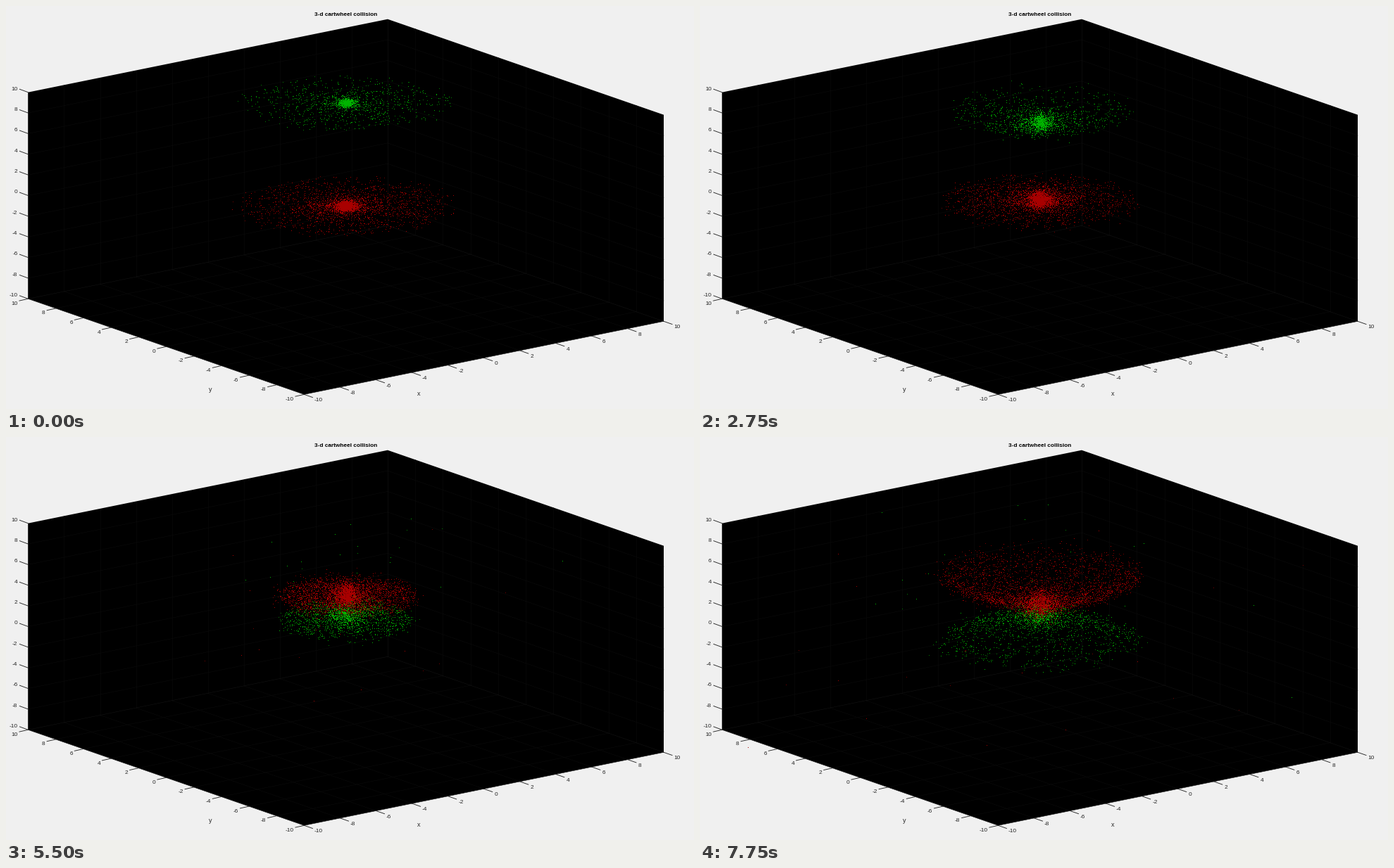
Write a matplotlib script that moves like this. It is 977x573 px and loops after 8000 ms.

```python
import numpy as np
import matplotlib.pyplot as plt
from matplotlib.animation import FuncAnimation

W, H, DPI = 977, 573, 64
FRAMES, INTERVAL = 32, 250
PX = 72 / DPI  # points per pixel
INK = "#262626"

plt.rcParams["font.family"] = "Liberation Sans"

# Orthographic view: screen shift per data unit
CENTER = np.array([482.7, 285.5])
EX = np.array([25.53, -5.2])
EY = np.array([-19.6, -6.8])
EZ = np.array([0.0, -14.68])
TILT = 0.266  # height to width of a flat disc on screen

fig = plt.figure(figsize=(W / DPI, H / DPI), dpi=DPI, facecolor="#f0f0f0")
ax = fig.add_axes([0, 0, 1, 1])
ax.set_xlim(0, W)
ax.set_ylim(H, 0)
ax.axis("off")


def project(x, y, z):
    return CENTER + x * EX + y * EY + z * EZ


def line(a, b, color, width=0.6):
    ax.plot([a[0], b[0]], [a[1], b[1]], color=color, lw=width * PX, zorder=2)


def label(x, y, s, size=8.3, ha="center", **kw):
    ax.text(x, y, s, fontsize=size * PX, ha=ha, va="center", **{"color": INK, **kw})


def tick(point, mark, text, value, ha):
    line(point, point + mark, INK, 0.9)
    label(*(point + text), str(value), ha=ha)


def draw_box():
    outline = [(-10, 10, 10), (10, 10, 10), (10, -10, 10),
               (10, -10, -10), (-10, -10, -10), (-10, 10, -10)]
    ax.fill(*np.array([project(*c) for c in outline]).T, color="black", lw=0, zorder=1)

    grid = "#0b0b0b"
    for v in range(-8, 10, 2):
        line(project(v, 10, -10), project(v, 10, 10), grid)
        line(project(10, v, -10), project(10, v, 10), grid)
        line(project(-10, 10, v), project(10, 10, v), grid)
        line(project(10, -10, v), project(10, 10, v), grid)
        line(project(v, -10, -10), project(v, 10, -10), grid)
        line(project(-10, v, -10), project(10, v, -10), grid)
    for end in [(-10, 10, -10), (10, -10, -10), (10, 10, 10)]:
        line(project(10, 10, -10), project(*end), "#121212")

    left, front = project(-10, 10, -10), project(-10, -10, -10)
    for a, b in [(left, project(-10, 10, 10)), (left, front),
                 (front, project(10, -10, -10))]:
        line(a, b, "#1a1a1a")
    for v in range(-10, 11, 2):
        tick(project(-10, 10, v), (-12, -4.4), (-15, -4.7), v, "right")
        tick(project(-10, v, -10), (-12.5, 2.8), (-15, 7), v, "right")
        tick(project(v, -10, -10), (12, 4.2), (14.5, 8.5), v, "left")

    label(586, 552, "x", 9)
    label(290, 545, "y", 9)
    label(482.5, 12, "3-d cartwheel collision", weight="bold", color="black")


def ramp(t, start, end):
    """Smooth step from 0 to 1 between two times."""
    s = np.clip((t - start) / (end - start), 0, 1)
    return s * s * (3 - 2 * s)


def separation(t):
    """Height between the cores: free fall, then a damped swing past each other."""
    cross = 4.87
    fall = 146 * np.cos(np.pi / 2 * (np.clip(t, 0, cross) / cross) ** 1.35)
    swing = -49 * np.sin(np.pi * (t - cross) / 3.25)
    return np.where(t < cross, fall, swing)


def mass_center(t):
    return np.interp(t, [0, 3, 6.5, 8], [236, 240, 233, 245])


class Galaxy:
    def __init__(self, seed, count, colors, z, share, rim, radius, core):
        rng = np.random.default_rng(seed)
        self.share, self.rim, self.radius, self.core = share, rim, radius, core
        n_core = int(count * 0.42)
        n_disc = count - n_core
        self.u = rng.random(n_disc)
        self.wobble = 1 + 0.05 * rng.standard_normal(n_disc)
        self.bulge = rng.gamma(1.6, 0.65, n_core)
        self.in_core = np.arange(count) >= n_disc
        self.theta = rng.uniform(0, 2 * np.pi, count)
        self.omega = 130 / (30 + np.concatenate([150 * self.u, 12 * self.bulge]))
        self.noise = rng.standard_normal((2, count))

        # Stray particles thrown out of the core
        n = 38
        self.launch = rng.normal(3.9, 1.3, n)
        speed = 25 + rng.exponential(45, n)
        angle = rng.uniform(0, 2 * np.pi, n)
        self.vel = speed * np.array([np.cos(angle), 0.5 * np.sin(angle)])

        self.bright = rng.random(count + n) < 0.55
        self.dots = [ax.plot([], [], ",", color=c, zorder=z + 0.1 * k)[0]
                     for k, c in enumerate(colors)]

    def mid(self, t):
        return mass_center(t) + self.share * separation(t)

    def bodies(self, t):
        radius, core, mid = self.radius(t), self.core(t), self.mid(t)
        power = 1.5 - ramp(t, 2, 6.5)  # the disc piles up at its rim
        r = np.concatenate([radius * self.u ** power * self.wobble, core * self.bulge])
        a = self.theta + self.omega * t
        fuzz = 1.5 + 3.5 * ramp(t, 0, 4.5) + 0.2 * core * self.in_core
        bowl = (self.rim(t) - mid) * np.minimum(r / radius, 1.2) ** 1.5
        x = CENTER[0] + r * np.cos(a) + 0.4 * fuzz * self.noise[0]
        y = mid + bowl + TILT * r * np.sin(a) + fuzz * self.noise[1]
        return x, y

    def strays(self, t):
        age = t - self.launch
        x = CENTER[0] + self.vel[0] * age
        y = self.mid(self.launch) + self.vel[1] * age
        hidden = (age < 0) | (abs(y - 281) > 189) | (abs(x - 460) > 400)
        return np.where(hidden, np.nan, x), y

    def update(self, t):
        x, y = np.hstack([self.bodies(t), self.strays(t)])
        for dots, pick in zip(self.dots, (~self.bright, self.bright)):
            dots.set_data(x[pick], y[pick])


draw_box()

green = Galaxy(
    4, 2000, ["#007800", "#00b400"], 5, share=-2 / 3,
    rim=lambda t: 139 + 153 * ramp(t, 2, 6.9),
    radius=lambda t: 148 - 53 * ramp(t, 1.5, 5) + 47 * ramp(t, 6.4, 7.8),
    core=lambda t: 5 + 10 * ramp(t, -0.2, 1.2) + 7 * ramp(t, 4, 7))

red = Galaxy(
    9, 4500, ["#700000", "#a80000"], 6, share=1 / 3,
    rim=lambda t: 285 - 90 * ramp(t, 1.8, 8),
    radius=lambda t: 155 - 60 * ramp(t, 1, 6.3) + 50 * ramp(t, 6.4, 7.8),
    core=lambda t: 9 + 3 * ramp(t, -0.2, 1.2) + 10 * ramp(t, 5, 7.75))


def update(i):
    t = i * INTERVAL / 1000
    green.update(t)
    red.update(t)
    return green.dots + red.dots


anim = FuncAnimation(fig, update, frames=FRAMES, interval=INTERVAL,
                     repeat=True, repeat_delay=0, blit=False)
plt.show()
```
